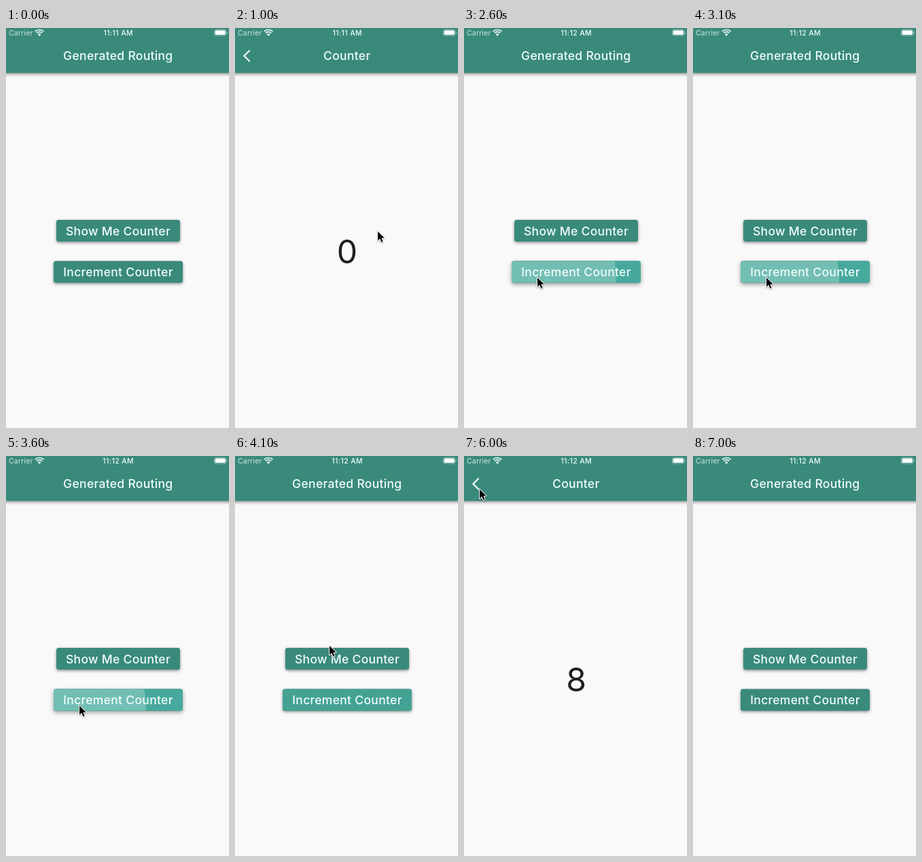
These frames come from a looping animation (328 by 588 pixels, 7600 ms). An HTML page with a canvas:

```html
<!DOCTYPE html>
<html lang="en">
<head>
<meta charset="utf-8">
<title>Counter</title>
<style>
html, body { margin: 0; width: 100%; height: 100%; overflow: hidden; background: #f9f9f9; }
canvas { display: block; }
</style>
</head>
<body>
<canvas id="stage" width="328" height="588"></canvas>
<script>
const W = 328, H = 588, MID = 164.8, LOOP = 7600, STEP = 100;
const TEAL = '#3a8a7c', LIT = '#46a99c', PAPER = '#f9f9f9', INK = '#f0fdfa';
const c = document.getElementById('stage').getContext('2d');

const clamp = v => Math.max(0, Math.min(1, v));
const ramp = (t, a, b) => clamp((t - a) / (b - a));

function cubic(x1, y1, x2, y2) {
  const at = (a, b, s) => 3 * (1 - s) ** 2 * s * a + 3 * (1 - s) * s * s * b + s ** 3;
  return x => {
    let lo = 0, hi = 1;
    for (let i = 0; i < 24; i++) {
      const s = (lo + hi) / 2;
      if (at(x1, x2, s) < x) lo = s; else hi = s;
    }
    return at(y1, y2, lo);
  };
}
const pushEase = cubic(.35, .91, .33, .97);
const popEase = cubic(.67, .03, .65, .09);

// Each visit to the counter page: when it slides in and out
const VISITS = [{ push: 720, pop: 1880, value: 0 }, { push: 4720, pop: 6190, value: 8 }];
const SLIDE = 300;

const SHOW = {
  label: 'Show Me Counter', x: 74, y: 282, w: 182, h: 32, on: 540, taps: [
    { t: 600, x: 210, y: 299 }, { t: 4600, x: 172, y: 302 }],
  lit: t => Math.max(hold(t, 540, 620, 760, 900), hold(t, 4540, 4620, 4760, 4900))
};
const ADD = {
  label: 'Increment Counter', x: 70, y: 342.5, w: 190, h: 32,
  taps: Array.from({ length: 8 }, (_, i) => ({ t: 2480 + 170 * i, x: 108, y: 367 })),
  lit: t => hold(t, 2440, 2560, 4050, 4300)
};

// Cursor waypoints: time, x, y
const PATH = [
  [100, 318, 170], [500, 210, 299], [1100, 210, 299], [1700, 20, 45], [1860, 20, 45],
  [2000, 65, 139], [2400, 108, 367], [3800, 108, 367], [4100, 139, 279],
  [4400, 172, 302], [5100, 172, 302], [5800, 22, 50], [6000, 23, 49], [6300, 23, 49]
];

function hold(t, a, b, d, e) {
  return ramp(t, a, b) * (1 - ramp(t, d, e));
}

function text(str, x, y, size, weight, color, spacing = 0, align = 'center') {
  c.font = `${weight} ${size}px Inter, Roboto, sans-serif`;
  c.letterSpacing = spacing + 'px';
  c.textAlign = align;
  c.fillStyle = color;
  c.fillText(str, x, y);
}

function shadow(alpha, blur, dy) {
  c.shadowColor = `rgba(0,0,0,${alpha})`;
  c.shadowBlur = blur;
  c.shadowOffsetY = dy;
}

function disc(x, y, r, alpha) {
  c.fillStyle = `rgba(255,255,255,${alpha})`;
  c.beginPath();
  c.arc(x, y, r, 0, 7);
  c.fill();
}

function button(b, t) {
  const lit = b.lit(t);
  const pressed = b.taps.some(p => t >= p.t - 60 && t < p.t + 160);
  c.save();
  c.beginPath();
  c.roundRect(b.x, b.y, b.w, b.h, 3.5);
  c.save();
  shadow(pressed ? .38 : .42, pressed ? 6 : 4, pressed ? 2.5 : 1.7);
  c.fillStyle = TEAL;
  c.fill();
  c.restore();
  c.globalAlpha = lit;
  c.fillStyle = LIT;
  c.fill();
  c.globalAlpha = 1;
  c.clip();
  for (const p of b.taps) {
    const age = t - p.t;
    if (age >= 0 && age < 260) disc(p.x, p.y, 8 + .9 * age, .24 * (1 - ramp(age, 130, 260)));
  }
  c.restore();
  text(b.label, MID + .2, b.y + 22.5, 17.5, 500, INK, .3);
}

function page(x, title, body) {
  c.save();
  c.translate(x, 0);
  c.beginPath();
  c.rect(0, 0, W, H);
  c.clip();
  c.fillStyle = PAPER;
  c.fillRect(0, 0, W, H);
  c.save();
  shadow(.5, 5, 1.8);
  c.fillStyle = TEAL;
  c.fillRect(-10, -10, W + 20, 76);
  c.restore();
  text(title, MID, 47, 17.5, 500, INK, .3);
  body();
  c.restore();
}

function edgeShadow(x) {
  const g = c.createLinearGradient(x - 16, 0, x, 0);
  g.addColorStop(0, 'rgba(0,0,0,0)');
  g.addColorStop(1, 'rgba(0,0,0,.04)');
  c.fillStyle = g;
  c.fillRect(x - 16, 0, 16, H);
}

function counter(visit, t) {
  const age = t - visit.pop + 60;
  if (age > 0) disc(24.5, 41, Math.min(30, 8 + age * .2), .06);
  c.strokeStyle = INK;
  c.lineWidth = 2.2;
  c.beginPath();
  c.moveTo(21.7, 32.8);
  c.lineTo(13.5, 41);
  c.lineTo(21.7, 49.2);
  c.stroke();
  text(visit.value, MID + .2, 346, 48, 400, '#1f1f1f');
}

function statusBar(t) {
  text('Carrier', 4, 11, 10.5, 400, '#cfe6e1', .2, 'left');
  text(t < 1500 ? '11:11 AM' : '11:12 AM', 165.2, 11, 10.5, 500, INK, .4);
  c.strokeStyle = INK;
  c.lineWidth = 1.7;
  for (const r of [9, 5.8]) {
    c.beginPath();
    c.arc(49.2, 11.5, r, -Math.PI * .75, -Math.PI * .25);
    c.stroke();
  }
  c.fillStyle = INK;
  c.beginPath();
  c.moveTo(49.2, 12);
  c.arc(49.2, 11.5, 3.2, -Math.PI * .75, -Math.PI * .25);
  c.fill();
  c.strokeStyle = 'rgba(255,255,255,.5)';
  c.lineWidth = .8;
  c.beginPath();
  c.roundRect(306.4, 2.4, 17.4, 8.8, 2.4);
  c.stroke();
  c.fillStyle = '#fff';
  c.beginPath();
  c.roundRect(307.5, 3.5, 15.2, 6.6, 1.5);
  c.fill();
  c.fillStyle = 'rgba(255,255,255,.55)';
  c.fillRect(324.6, 5.3, 1.1, 3);
}

function cursor(t) {
  const i = PATH.findIndex(p => p[0] > t);
  if (i < 1) return;
  const [a, b] = [PATH[i - 1], PATH[i]];
  const k = ramp(t, a[0], b[0]);
  c.save();
  c.translate(a[1] + (b[1] - a[1]) * k, a[2] + (b[2] - a[2]) * k);
  c.beginPath();
  c.moveTo(0, 0);
  for (const [x, y] of [[0, 13.5], [3.2, 10.6], [5.4, 15.8], [7.6, 14.9], [5.4, 9.8], [9.6, 9.6]]) c.lineTo(x, y);
  c.closePath();
  c.lineJoin = 'round';
  c.strokeStyle = '#fff';
  c.lineWidth = 2;
  c.save();
  shadow(.35, 2, 1);
  c.stroke();
  c.restore();
  c.fillStyle = '#000';
  c.fill();
  c.restore();
}

function draw(t) {
  const visit = VISITS.find(v => t >= v.push && t < v.pop + SLIDE);
  const shown = !visit ? 0 : t < visit.pop
    ? pushEase(ramp(t, visit.push, visit.push + SLIDE))
    : popEase(1 - ramp(t, visit.pop, visit.pop + SLIDE));
  page(-W * .375 * shown, 'Generated Routing', () => {
    button(SHOW, t);
    button(ADD, t);
  });
  if (visit) {
    const x = shown > .995 ? 0 : W * (1 - shown);
    edgeShadow(x);
    page(x, 'Counter', () => counter(visit, t));
  }
  statusBar(t);
  cursor(t);
}

function tick() {
  draw(Math.floor(performance.now() % LOOP / STEP) * STEP);
  requestAnimationFrame(tick);
}
tick();
</script>
</body>
</html>
```
